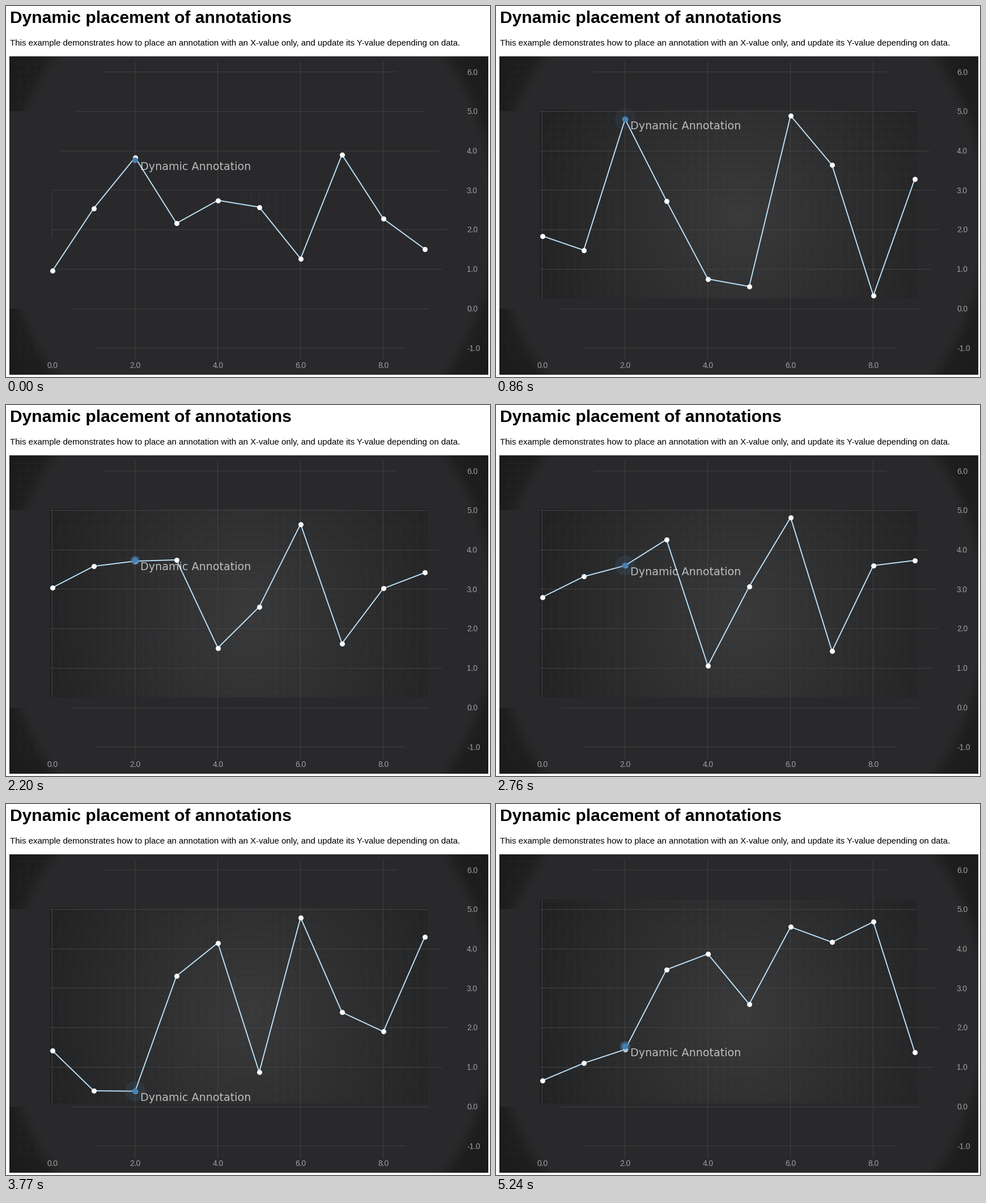
Recreate the animation shown at these times as a matplotlib script. Size 854 by 656 pixels, loop 5260 ms.

```python
import numpy as np
import matplotlib.pyplot as plt
from matplotlib.animation import FuncAnimation
from matplotlib.patches import Circle

W, H, DPI = 854, 656, 64
LOOP, TICK = 5260, 20
STEP = 145.5     # ms between two refreshes of the picture
PERIOD = 993     # ms between two data sets, and length of one pulse
MORPH = 512      # ms a change of data takes
LAG = 16         # ms the annotation trails the data
PX = 72 / DPI    # points per pixel

X0, DX = 81.8, 73.0
Y0, DY = 535.0, 69.75
STEEL = "#4682b4"

# Successive random walks of the line: one row per data set.
DATA = np.array([
    [0.89, 2.62, 3.76, 2.12, 2.89, 2.72, 1.00, 3.92, 2.42, 1.38],
    [1.84, 1.48, 4.80, 2.73, 0.75, 0.56, 4.89, 3.64, 0.33, 3.28],
    [3.95, 4.58, 4.14, 1.78, 3.23, 0.59, 4.01, 2.37, 0.81, 2.24],
    [2.80, 3.32, 3.60, 4.26, 1.06, 3.07, 4.82, 1.43, 3.60, 3.73],
    [1.42, 0.40, 0.39, 3.31, 4.15, 0.87, 4.79, 2.39, 1.90, 4.30],
    [1.59, 4.67, 4.98, 4.85, 1.45, 1.62, 3.55, 4.66, 0.72, 0.98],
    [0.57, 0.76, 1.11, 3.34, 4.10, 2.69, 4.65, 4.12, 5.06, 1.42],
])


def sx(v):
    return X0 + DX * v


def sy(v):
    return Y0 - DY * v


def values(t):
    """Data at time t, easing out cubically towards the newest set."""
    k, since = divmod(max(t + 12, 0), PERIOD)
    a, b = DATA[int(k):int(k) + 2]
    u = min(since / MORPH, 1)
    return a + (b - a) * (1 - (1 - u) ** 3)


def pose(t):
    """Line heights, annotation height, halo radius and opacity."""
    p = (t - 20) / PERIOD % 1
    return sy(values(t)), sy(values(t - LAG)[2]), 5 + 16 * p, 0.65 * (1 - p)


def repainted_rows():
    """Top and bottom of the repainted area, which only ever grows."""
    tops, bottoms = [], []
    for t in np.arange(0, LOOP, STEP):
        ys, mark, r, alpha = pose(t)
        r = r if alpha > 0.12 else 5
        tops.append(min(ys.min() - 5, mark - r))
        bottoms.append(max(ys.max() + 5, mark + max(r, 21.5)))
    return (np.minimum.accumulate(tops).astype(int),
            np.ceil(np.maximum.accumulate(bottoms)).astype(int))


def tint(v):
    return np.clip(v[..., None] + np.array([0, 0.4, 1.6]), 0, 255)


def backgrounds():
    """The flat resting panel and the fully shaded one."""
    y, x = np.mgrid[0:H, 0:W]
    d = np.hypot((x - 430) / 428, (y - 370) / 459)
    shade = 57 - 26 * d

    minor = np.zeros((H, W), bool)
    major = np.zeros((H, W), bool)
    for k in range(-4, 50):
        minor[98:626, int(sx(k / 5))] = True
    for k in range(-6, 32):
        minor[int(sy(k / 5)), 15:808] = True
    for v in range(0, 10, 2):
        major[98:626, int(sx(v))] = True
    for v in range(-1, 7):
        major[int(sy(v)), 15:808] = True

    full = np.where(major, 67, shade + 5 * minor)

    # At rest only the corners are shaded, and the grid stops short of them.
    dark = np.clip((d - 0.98) / 0.06, 0, 1)
    dark[186:535, :W // 2] = 0
    base = 41.5 + (shade - 41.5) * dark + 6 * minor * dark * (x < 90)
    base[326:395, 404:495] += 7 * minor[326:395, 404:495]
    base = np.where(major & (d < 0.82), 63, base)

    panel = np.full((H, W, 3), 255.0)
    area = np.s_[89:652, 6:851]
    panel[area] = tint(base)[area]
    return panel.astype(np.uint8), tint(full).astype(np.uint8)


fig = plt.figure(figsize=(W / DPI, H / DPI), dpi=DPI, facecolor="white")
ax = fig.add_axes([0, 0, 1, 1])
ax.set(xlim=(0, W), ylim=(H, 0))
ax.axis("off")

BASE, FULL = backgrounds()
TOPS, BOTTOMS = repainted_rows()
backdrop = fig.figimage(BASE, origin="upper", zorder=-1)


def label(x, y, s, px, family="Liberation Sans", **kw):
    return ax.text(x, y, s, fontsize=px * PX, family=family, va="baseline", **kw)


label(6.8, 30, "Dynamic placement of annotations", 30, weight="bold")
label(6.8, 70, "This example demonstrates how to place an annotation with an X-value only, "
      "and update its Y-value depending on data.", 14.95)
for v in range(-1, 7):
    label(813, sy(v) + 5, f"{v:.1f}", 13.8, color="#a0a0a2")
for v in range(0, 10, 2):
    label(sx(v) + 0.5, 639.5, f"{v:.1f}", 13.8, color="#a0a0a2", ha="center")

xs = sx(np.arange(10))
line, = ax.plot(xs, xs, color="#bfe3fb", lw=1.9 * PX, marker="o", ms=9 * PX,
                mfc="white", mew=0, solid_joinstyle="round", zorder=3)
halo, dot = (ax.add_patch(Circle((sx(2), 0), 5, fc=STEEL, lw=0, zorder=z))
             for z in (4, 5))
note = label(237, 0, "Dynamic Annotation", 19.1, family="DejaVu Sans",
             color="white", alpha=0.68, zorder=6)


def update(i):
    k = int((i * TICK + 25) / STEP)
    img = BASE.copy()
    if k > 0:
        area = np.s_[TOPS[k]:BOTTOMS[k], 77:743]
        img[area] = FULL[area]
    backdrop.set_data(img)

    ys, mark, r, alpha = pose(k * STEP)
    line.set_ydata(ys)
    halo.center = dot.center = (sx(2), mark)
    halo.set_radius(r)
    halo.set_alpha(alpha)
    note.set_y(mark + 17.3)
    return backdrop, line, halo, dot, note


anim = FuncAnimation(fig, update, frames=LOOP // TICK, interval=TICK,
                     init_func=lambda: update(0), repeat=True,
                     repeat_delay=0, blit=False)
plt.show()
```
